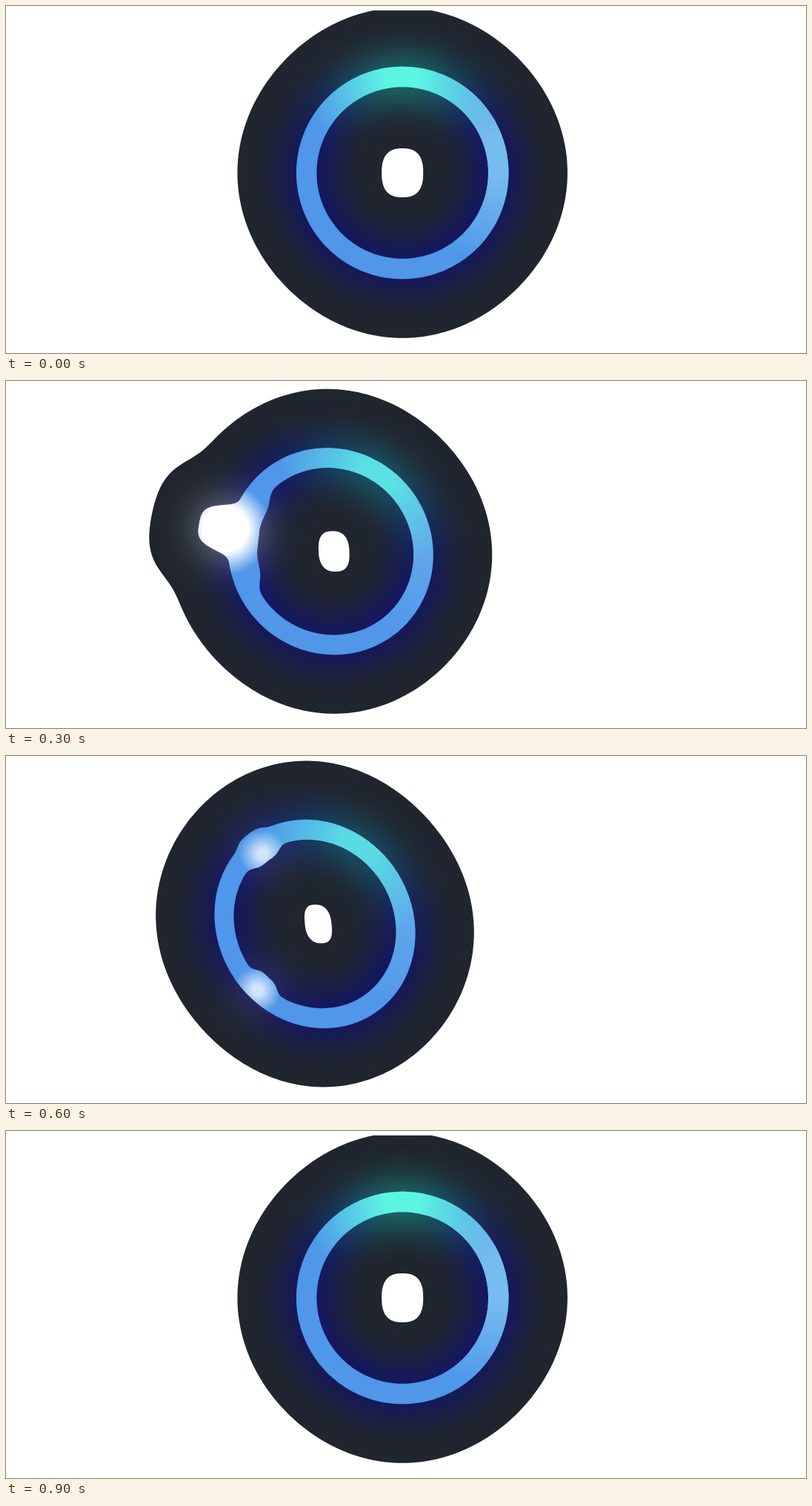
An HTML page with a canvas for the animation above (0.96 s loop, 1080x468 px).

```html
<!DOCTYPE html>
<html>
<head>
<meta charset="utf-8">
<style>
html, body { margin: 0; width: 100%; height: 100%; overflow: hidden; background: #fff; }
canvas { display: block; }
</style>
</head>
<body>
<canvas id="stage" width="1080" height="468"></canvas>
<script>
const W = 1080, H = 468, LOOP = 960, STEP = 60, TAU = Math.PI * 2, DEG = Math.PI / 180;
const OUTER = 143.3, INNER = 115.8, HALO = 79.5;
const IMPACT = 12 * DEG; // hit direction, measured upwards from the left

const ctx = document.getElementById('stage').getContext('2d');
const layer = document.createElement('canvas');
layer.width = W;
layer.height = H;
const glowCtx = layer.getContext('2d');

const BODY = { base: '#5096e9', light: '#76bcee', teal: '#5cf5e2', tint: '#35e9da', white: '#ffffff', pink: '#c8ccd0' };
const GLOW = { base: '#0000b8', light: '#0000b8', teal: '#12d8bc', tint: '#0aa384', white: '#8a93a0', pink: '#0aa384' };

const REST = { x: 535.2, y: 225, sx: 1, sy: 1, shear: 0, turn: 0, teal: 1, light: 1, rx: 28, ry: 33, lean: 0 };
const SQUASH = { ...REST, x: 535.7, y: 242.5, sx: 1.124, sy: .878, teal: .85, rx: 35, ry: 24.5 };
const FLY = { ...REST, x: 459.5, y: 233, sx: .99, sy: .965, shear: -.018, turn: .55, teal: .85, light: .45, rx: 27, ry: 30 };
const HIT = { x: 417, y: 226.5, sx: .942, sy: .982, shear: .087, turn: .58, teal: .7, light: .4, rx: 21.5, ry: 27.5, lean: 4 };
const POSES = [[0, REST], [120, SQUASH], [240, FLY], [360, HIT], [720, HIT], [900, REST]];

const mix = (a, b, u) => a + (b - a) * u;
const clamp = v => Math.max(0, Math.min(1, v));
const ramp = (t, a, b) => clamp((t - a) / (b - a));
const pulse = (t, a, b, c, d) => Math.min(ramp(t, a, b), 1 - ramp(t, c, d));
const peak = (q, centre, width) => Math.exp(-(((q - centre) / width) ** 4));

function poseAt(t) {
  let i = 0;
  while (i < POSES.length - 2 && t >= POSES[i + 1][0]) i++;
  const [t0, a] = POSES[i], [t1, b] = POSES[i + 1];
  const u = ramp(t, t0, t1), pose = {};
  for (const k in a) pose[k] = mix(a[k], b[k], u);
  return pose;
}

// two waves run round the ring from the point of impact
function waveAt(t) {
  const u = ramp(t, 360, 720);
  return {
    u,
    on: pulse(t, 240, 360, 720, 840),
    up: mix(24, 68, u) * DEG,
    down: mix(-7, -70, u) * DEG,
    width: mix(18, 9, u) * DEG,
    height: mix(25, 4, u)
  };
}

const place = (p, x, y) => [p.x + p.sx * x + p.shear * y, p.y + p.sy * y];
const polar = (p, q, r) => [p.x - r * Math.cos(q), p.y - r * Math.sin(q)];

function loopPath(path, point, dir = 1) {
  for (let i = 0; i < 240; i++) {
    const a = dir * i / 240 * TAU;
    const [x, y] = point(Math.cos(a), Math.sin(a));
    if (i) path.lineTo(x, y); else path.moveTo(x, y);
  }
  path.closePath();
}

// ellipse of the pose, pushed outwards by extra(angle)
function outline(path, p, radius, extra, dir) {
  loopPath(path, (c, s) => {
    const [x, y] = place(p, radius * c, radius * s);
    const q = Math.atan2(p.y - y, p.x - x), r = extra(q);
    return [x - r * Math.cos(q), y - r * Math.sin(q)];
  }, dir);
}

function bodyPath(p, w, t) {
  const path = new Path2D();
  const drop = 42 * pulse(t, 120, 240, 360, 480);
  const dropWidth = mix(.18, .23, ramp(t, 240, 360));
  const crest = 18 * pulse(t, 360, 480, 480, 660);
  const dent = w.on * w.height;
  outline(path, p, OUTER, q => drop * peak(q, IMPACT, dropWidth) + crest * peak(q, w.up, .16));
  outline(path, p, INNER, q => -dent * Math.min(1.1, peak(q, w.up, w.width) + peak(q, w.down, w.width)), -1);
  return path;
}

function haloPath(p, t) {
  const path = new Path2D();
  const bump = 28 * ramp(t, 120, 240) + 21 * ramp(t, 360, 480) - 49 * ramp(t, 480, 600);
  outline(path, p, OUTER, q => HALO - 3 * Math.sin(2 * q) ** 2 + bump * peak(q, IMPACT, .36));
  return path;
}

function holePath(p, t) {
  const path = new Path2D();
  const shrink = pulse(t, 240, 360, 480, 720);
  const boxy = v => Math.sign(v) * Math.abs(v) ** .78;
  const rx = p.rx - 7 * shrink, ry = p.ry - 3 * shrink, x = p.x + 9 * shrink;
  loopPath(path, (c, s) => [x + rx * boxy(c) + p.lean * s, p.y + ry * boxy(s)]);
  return path;
}

function dropsPath(t) {
  const path = new Path2D();
  const size = t < 480 ? 0 : 1 - ramp(t, 480, 600);
  if (size) {
    path.ellipse(234, 182, 25 * size, 10 * size, -62 * DEG, 0, TAU);
    path.closePath();
    path.moveTo(251, 223);
    path.ellipse(251, 223, 9 * size, 6 * size, 35 * DEG, 0, TAU);
  }
  return path;
}

function spot(c, path, color, [x, y], r, solid, alpha) {
  if (alpha <= 0) return;
  const g = c.createRadialGradient(x, y, 0, x, y, r);
  g.addColorStop(0, color);
  g.addColorStop(solid, color);
  g.addColorStop(1, color + '00');
  c.globalAlpha = alpha;
  c.fillStyle = g;
  c.fill(path);
  c.globalAlpha = 1;
}

function paint(c, pal, p, w, path, t) {
  const flash = pulse(t, 300, 360, 360, 420);
  c.fillStyle = pal.base;
  c.fill(path);
  spot(c, path, pal.light, place(p, 135, -25), 150, .2, p.light);
  spot(c, path, pal.teal, place(p, 130 * Math.sin(p.turn), -130 * Math.cos(p.turn)), 132, .18, p.teal);

  c.globalAlpha = flash;
  c.fillStyle = pal.tint;
  c.fill(path);
  c.globalAlpha = 1;
  spot(c, path, pal.pink, [500, 148], 155, .1, flash);

  const u = ramp(t, 240, 360);
  spot(c, path, pal.white, polar(p, IMPACT, mix(167, 124, u)), mix(46, 78, u), .5, pulse(t, 120, 240, 360, 480));
  spot(c, path, pal.tint, polar(p, IMPACT + .04, 126), 34, .1, .7 * flash);

  const shine = pulse(t, 360, 480, 720, 840) * mix(1.15, .55, w.u);
  for (const q of [w.up, w.down]) {
    spot(c, path, pal.white, polar(p, q, 118), mix(48, 24, w.u), .2, Math.min(1, shine));
  }
  c.fillStyle = pal.white;
  c.fill(dropsPath(t));
}

function draw(t) {
  const p = poseAt(t), w = waveAt(t), body = bodyPath(p, w, t);

  glowCtx.clearRect(0, 0, W, H);
  paint(glowCtx, GLOW, p, w, body, t);

  ctx.clearRect(0, 0, W, H);
  ctx.save();
  ctx.clip(haloPath(p, t));
  ctx.fillStyle = '#20252e';
  ctx.fillRect(0, 6, W, H);
  ctx.filter = 'blur(28px)';
  ctx.drawImage(layer, 0, 0);
  ctx.restore();

  ctx.fillStyle = '#fff';
  ctx.fill(holePath(p, t));
  paint(ctx, BODY, p, w, body, t);
  ctx.clearRect(0, 0, W, 6);
}

let last = -1;
function tick(now) {
  const t = Math.floor(now % LOOP / STEP) * STEP;
  if (t !== last) draw(last = t);
  requestAnimationFrame(tick);
}
requestAnimationFrame(tick);
</script>
</body>
</html>
```
